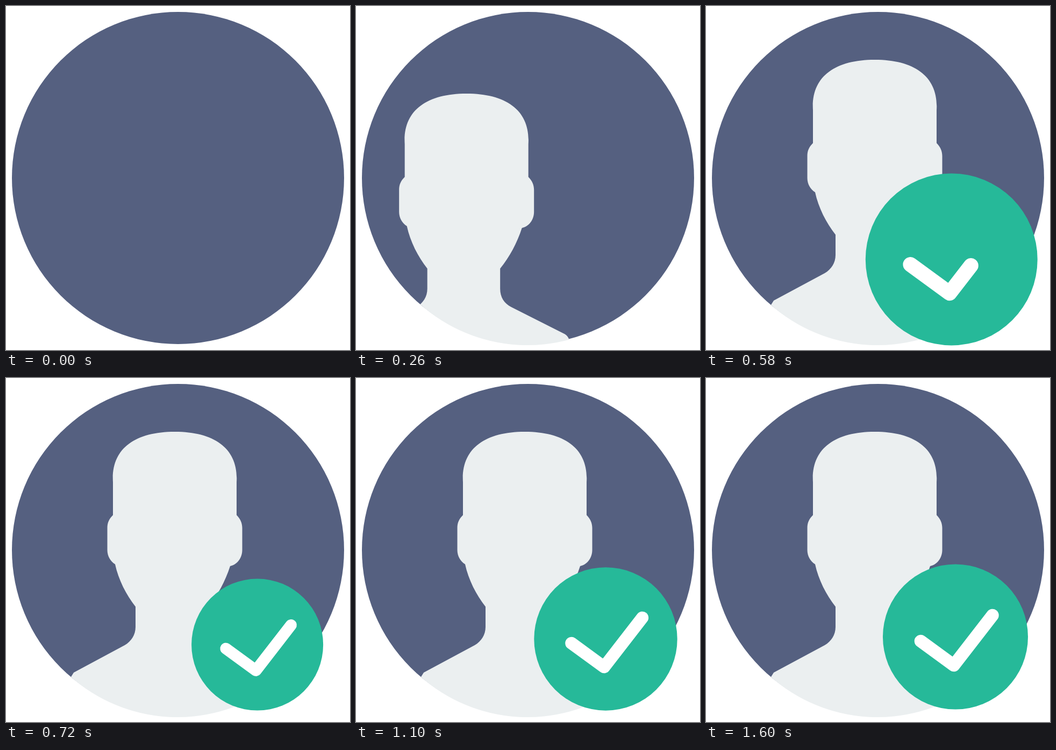
An HTML page with a canvas that plays this animation: 640 px wide and 640 px high, repeating every 1.62 s.

```html
<!DOCTYPE html>
<html lang="en">
<head>
<meta charset="utf-8">
<title>Verified profile</title>
<style>
  html, body { margin: 0; width: 100%; height: 100%; overflow: hidden; background: #fff; }
  canvas { display: block; width: 640px; height: 640px; }
</style>
</head>
<body>
<canvas id="stage" width="640" height="640"></canvas>
<script>
const ctx = document.getElementById('stage').getContext('2d');
const LOOP = 1620, STEP = 20, TAU = Math.PI * 2;
const OMEGA = TAU / 375;

const person = new Path2D(`M314 100 C390 100 433 133 429 194 V255
  C436 262 439.5 270 439.5 279 V320 C439.5 335 430 347 417 350
  C408 378 394 404 376.5 425.5 V463 C376.5 479 384 490 397 497
  L497 547.5 C501 550 503 553 505 558 V700 H121 V556 L126 548
  L221 497 C233 490 241 478 241 463 V425.5
  C224 404 209 375 203 346.5 C194 341 188.5 331 188.5 320 V279
  C188.5 269 192 262 199 255 V194 C195 133 238 100 314 100 Z`);

// The badge disc, with a slightly bulging bottom edge
const mask = new Path2D();
mask.arc(320, 320, 309, 2.275, 0.995 + TAU);
mask.arc(319, 331, 300, 0.972, 2.296);
mask.closePath();

const clamp = v => Math.min(1, Math.max(0, v));
const smooth = v => v * v * (3 - 2 * v);
const spring = (dt, amp, decay) => amp * Math.sin(OMEGA * dt) * Math.exp(-decay * dt / 1000);

function disc(x, y, r, color) {
  ctx.fillStyle = color;
  ctx.beginPath();
  ctx.arc(x, y, r, 0, TAU);
  ctx.fill();
}

function drawPerson(t) {
  const left = 412 * (1 - smooth(clamp(t / 415) ** 0.876));
  ctx.save();
  ctx.clip(mask);
  ctx.translate(-left, left * 0.581);
  ctx.fillStyle = '#ebeff0';
  ctx.fill(person);
  ctx.restore();
}

function drawTick(progress) {
  if (progress <= 0) return;
  const [ax, ay, bx, by, cx, cy] = [-64.5, 8, -3, 53, 69, -40];
  const first = Math.hypot(bx - ax, by - ay), second = Math.hypot(cx - bx, cy - by);
  const length = progress * (first + second);
  const p = clamp(length / first), q = clamp((length - first) / second);
  ctx.beginPath();
  ctx.moveTo(ax, ay);
  ctx.lineTo(ax + (bx - ax) * p, ay + (by - ay) * p);
  if (q > 0) ctx.lineTo(bx + (cx - bx) * q, by + (cy - by) * q);
  ctx.strokeStyle = '#fff';
  ctx.lineWidth = 23.5;
  ctx.lineCap = ctx.lineJoin = 'round';
  ctx.stroke();
}

function drawBadge(t) {
  const r = t < 460 ? 135 * clamp((t - 260) / 200) : 135 + spring(t - 460, 51.5, 5.2);
  if (r <= 0) return;
  const x = 464 - 0.29 * (r - 135);
  const y = t < 419 ? 482 + (419 - t) * 3 / 19 : 482 - spring(t - 419, 43.9, 3.6);
  disc(x, y, r, '#26b999');
  ctx.save();
  ctx.translate(x, y);
  ctx.scale(r / 135, r / 135);
  drawTick(smooth(clamp((t - 450) / 210)));
  ctx.restore();
}

function draw(t) {
  ctx.fillStyle = '#fff';
  ctx.fillRect(0, 0, 640, 640);
  disc(320, 320, 309, '#556080');
  drawPerson(t);
  drawBadge(t);
}

const start = performance.now();
function tick(now) {
  const t = Math.max(0, now - start) % LOOP;
  draw(Math.floor(t / STEP) * STEP);
  requestAnimationFrame(tick);
}
draw(0);
requestAnimationFrame(tick);
</script>
</body>
</html>
```
